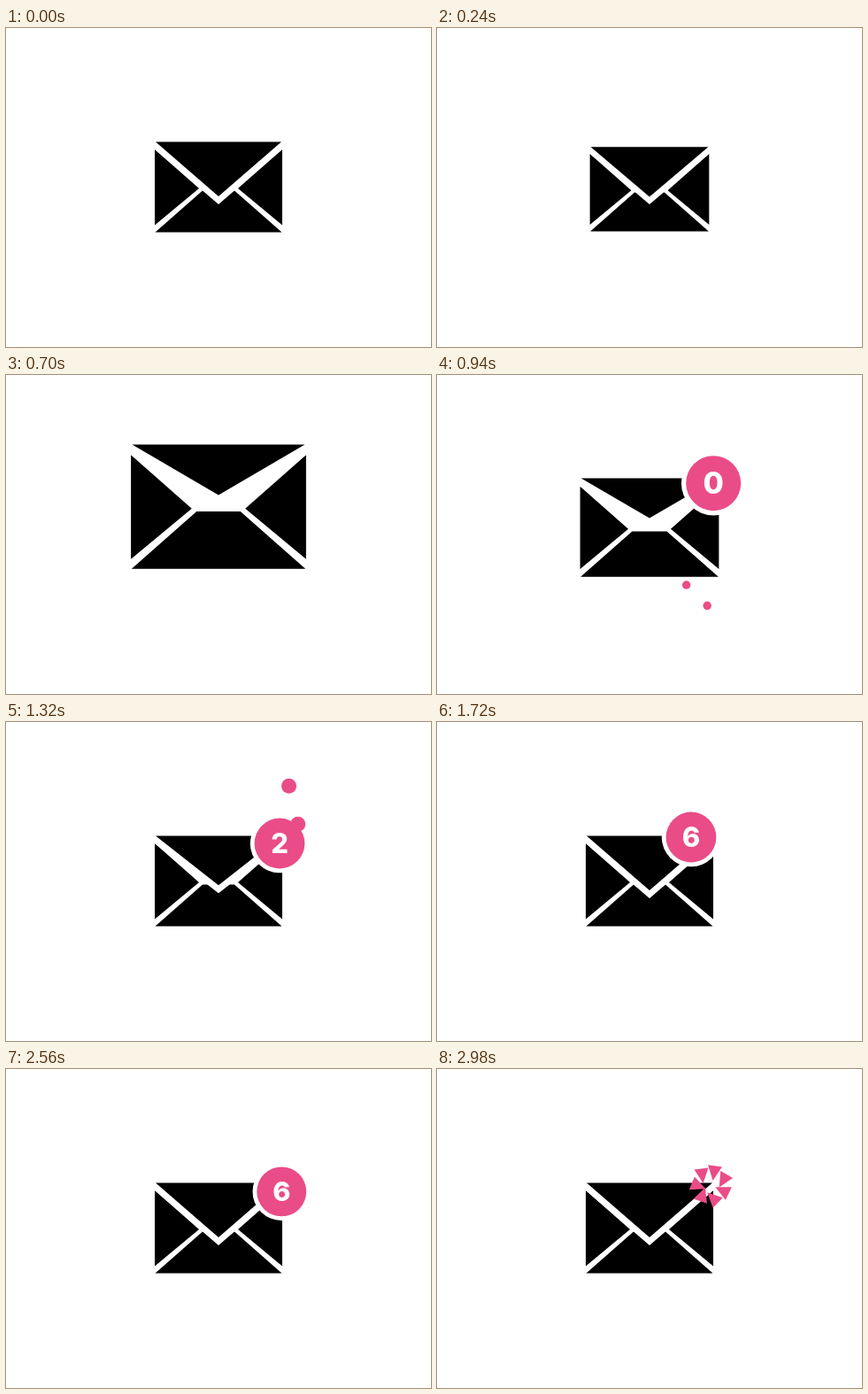
Animation of 480 by 360 pixels, one loop 3 s. Source, as an HTML page with a canvas:

```html
<!DOCTYPE html>
<html lang="en">
<head>
<meta charset="utf-8">
<title>Mail badge</title>
<style>
  html, body { margin: 0; width: 100%; height: 100%; overflow: hidden; background: #fff; }
  canvas { display: block; }
</style>
</head>
<body>
<canvas id="stage" width="480" height="360"></canvas>
<script>
const ctx = document.getElementById('stage').getContext('2d');
const TAU = Math.PI * 2;
const LOOP = 3000;
const PINK = '#ea4c88';
const HOME = { x: 311.5, y: 139.5, r: 28.4 };
const POP = 720, BURST = 2710;
const SHARDS = 7;

// Direction in degrees and distance from which each dot flies to the badge.
const DOTS = [[93, 121], [107, 102], [-49, 80], [-83, 73], [-20, 62], [15, 62]];

const clamp = v => Math.max(0, Math.min(1, v));
const mix = (a, b, k) => a + (b - a) * k;
const linear = (t, from, to) => clamp((t - from) / (to - from));
const ramp = (t, from, to) => {
  const u = linear(t, from, to);
  return u * u * (3 - 2 * u);
};
// Rises from a to b and falls from c to d.
const swell = (t, a, b, c, d) => ramp(t, a, b) * (1 - ramp(t, c, d));

const leap = t => ramp(t, 540, 700) * (1 - linear(t, 700, 1100)) ** 1.56;
const hitTime = i => 1160 + 88 * i;
const birthTime = i => 905 + 265 * Math.floor(i / 2);

function poly(color, ...points) {
  ctx.fillStyle = color;
  ctx.beginPath();
  for (const [x, y] of points) ctx.lineTo(x, y);
  ctx.fill();
}

function disc(color, x, y, r) {
  if (r <= 0) return;
  ctx.fillStyle = color;
  ctx.beginPath();
  ctx.arc(x, y, r, 0, TAU);
  ctx.fill();
}

function drawMail(t) {
  const squash = swell(t, 0, 540, 540, 700), jump = leap(t);
  const size = 1 - .155 * squash + .375 * jump;
  const tip = 10.5 - 21 * swell(t, 150, 780, 860, 1560);
  ctx.save();
  ctx.translate(240, 179.5 + 5.5 * squash - 31 * jump);
  ctx.scale(size, size);
  for (const k of [-1, 1]) {
    poly('#000', [72 * k, -42.5], [22 * k, 1.5], [72 * k, 43]);
  }
  poly('#000', [-71.5, 51], [-18, 4], [18, 4], [71.5, 51]);
  poly('#fff', [-72, -42.5], [0, tip + 9], [72, -42.5]);
  poly('#000', [-71, -51], [71, -51], [0, tip]);
  ctx.restore();
}

function badgeAt(t) {
  const jump = leap(t);
  const kick = swell(t, 1600, 1720, 1720, 1980);
  const sag = swell(t, 1100, 1300, 1500, 1600);
  const tense = ramp(t, 2520, 2700);
  return {
    x: HOME.x + 3 * jump - 24.5 * kick - 2.5 * sag - 2 * tense,
    y: HOME.y - 73 * jump - 9.5 * kick - 2.5 * sag - 8.5 * tense,
    r: (HOME.r + 11 * jump - 3.4 * tense) * ramp(t, POP, 860)
  };
}

function drawDots(t, badge) {
  DOTS.forEach(([angle, far], i) => {
    const born = birthTime(i), hit = hitTime(i);
    if (t < born || t >= hit) return;
    const a = angle * TAU / 360;
    const k = linear(t, born, hit) ** 5;
    const x = mix(HOME.x + far * Math.cos(a), badge.x, k);
    const y = mix(HOME.y + far * Math.sin(a), badge.y, k);
    disc(PINK, x, y, 8.5 * clamp((t - born) / 65));
  });
}

function drawBadge(t, badge) {
  const { x, y, r } = badge;
  disc('#fff', x, y, r * 1.17);
  disc(PINK, x, y, r);
  drawDots(t, badge);
  if (r < 1) return;
  const size = r * 1.09;
  const count = DOTS.filter((_, i) => t >= hitTime(i)).length;
  ctx.fillStyle = '#fff';
  ctx.font = `800 ${size}px Inter, "Open Sans", sans-serif`;
  ctx.textAlign = 'center';
  ctx.fillText(count, x, y + size * .364);
}

// The disc splits into wedges that shrink and turn about their own centres.
function drawShards(t, { x, y, r }) {
  const p = linear(t, BURST, 2980);
  const q = 1 - (1 - p) ** 2;
  const half = Math.PI / SHARDS;
  const rimX = r * Math.cos(half), rimY = r * Math.sin(half);
  const mid = rimX * 2 / 3;
  disc('#fff', x, y, r * 1.17 * (1 - clamp(p * 1.6)));
  for (let i = 0; i < SHARDS; i++) {
    ctx.save();
    ctx.translate(x, y);
    ctx.rotate((2 * i + 1) * half);
    ctx.translate(mix(mid, 16.5, q), 0);
    ctx.rotate(.6 * Math.sin(i * 5) * q);
    ctx.scale(mix(1, .74, q), mix(1, .74, q));
    poly(PINK, [-mid, 0], [rimX - mid, -rimY], [rimX - mid, rimY]);
    ctx.restore();
  }
}

function draw(t) {
  ctx.fillStyle = '#fff';
  ctx.fillRect(0, 0, 480, 360);
  drawMail(t);
  const badge = badgeAt(t);
  if (t >= BURST) drawShards(t, badge);
  else if (t > POP) drawBadge(t, badge);
}

const begin = performance.now();
function frame() {
  draw((performance.now() - begin) % LOOP);
  requestAnimationFrame(frame);
}
frame();
</script>
</body>
</html>
```
